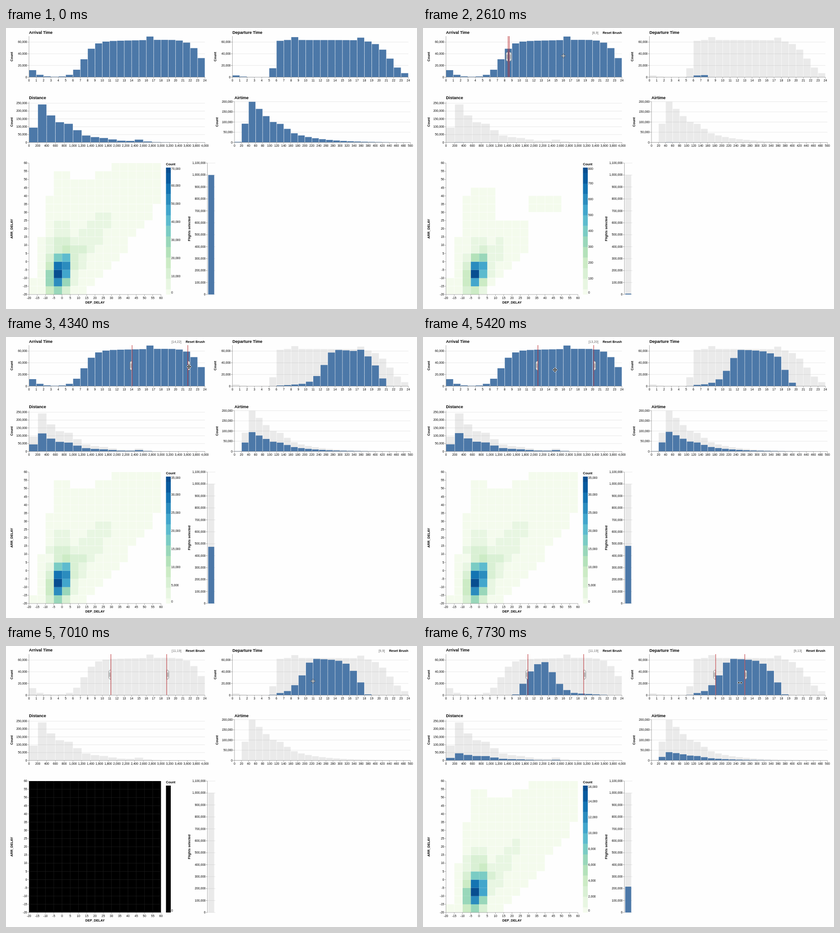
Animation of 903 by 620 pixels, one loop 8 s. Source, as an HTML page with a canvas:

```html
<!DOCTYPE html>
<html lang="en">
<head>
<meta charset="utf-8">
<title>Linked flight histograms</title>
<style>
html, body { margin: 0; width: 100%; height: 100%; overflow: hidden; background: #fefefe; }
canvas { display: block; }
</style>
</head>
<body>
<canvas id="stage" width="903" height="620"></canvas>
<script>
const g = document.getElementById('stage').getContext('2d');
const LOOP = 8000, HOUR = 16.1, BLUE = '#4c78a8', GHOST = 'rgba(150,150,150,.19)';
const FONT = '"Liberation Sans", Arial, sans-serif';

const clamp = (v, lo, hi) => Math.min(hi, Math.max(lo, v));
const sum = list => list.reduce((a, b) => a + b, 0);
const fmt = n => n.toLocaleString('en-US');
const sigmoid = x => 1 / (1 + Math.exp(-x));
const bump = (x, center, width = 1) => Math.exp(-(((x - center) / width) ** 2));
const make = (n, f) => Array.from({ length: n }, (_, i) => f(i));

// Histogram counts in thousands: a busy day with quiet nights, and long decaying tails
const arrivals = make(24, h => 12 * Math.exp(-1.1 * h) + 6 * bump(h, 16, .5)
  + (59.5 + h / 4) * sigmoid((h - 7) / .75) * sigmoid((23 - h) / .85));
const departures = make(24, h => 3 * Math.exp(-1.1 * h) + 5 * (bump(h, 8, .5) + bump(h, 17, .5))
  + 63.5 * sigmoid((h - 5.23) / .2) * sigmoid((21 - h) / .95));
const distances = make(20, i => 351 * .7 ** i * sigmoid((i - .19) / .19)
  + 36 * bump(i, 4.2) + 8 * bump(i, 8, 1.5) + 13 * bump(i, 12, .8));
const airtimes = make(25, i => 340 * .775 ** i * sigmoid((i - 1.15) / .24)
  + 8 * bump(i, 3.5) + 18 * bump(i, 6.2));

// Share of flights that have landed x hours after the hour they left in
const landed = x => .9 * (1 - Math.exp(-((Math.max(0, x - .6) / 1.97) ** 1.75))) + .1 * clamp(x / 10, 0, 1);

// Heatmap moods: left edge shift, peak of columns 2 and 4, peak width, strength of the far cells
const heats = {
  all: { edge: 3, left: .43, right: .74, width: 2.33, far: 1 },
  wide: { edge: 4, left: .28, right: .74, width: 2.33, far: 1 },
  thin: { edge: 3, left: .3, right: .65, width: 1.84, far: .4, sparse: true },
  both: { edge: 4, left: .43, right: .7, width: 2.33, far: .7 }
};

const span = left => [left, left + 122.5];
const steps = [
  { t: 0 },
  { t: 450, cur: ['arrow', 181.5, 28] },
  { t: 840, cur: ['arrow', 184, 53] },
  { t: 1050, cur: ['arrow', 185, 59] },
  { t: 1500, cur: ['arrow', 185.7, 59] },
  { t: 2160, cur: ['cross', 213, 64.5] },
  { t: 2610, cur: ['cross', 308.5, 61.5], arr: [187, 189.5], heat: 'thin', max: 800 },
  { t: 2940, cur: ['cross', 308.5, 61.5], arr: span(187) },
  { t: 3260, cur: ['move', 250.5, 68.5], arr: span(187) },
  { t: 3720, cur: ['move', 291.5, 68.5], arr: span(187) },
  { t: 4070, cur: ['move', 338, 67], arr: span(231.5) },
  { t: 4340, cur: ['move', 402, 65.5], arr: span(277) },
  { t: 4910, cur: ['move', 313, 70], arr: span(314.5) },
  { t: 5420, cur: ['move', 290, 72.5], arr: span(252.5) },
  { t: 5930, cur: ['cross', 544, 60], arr: span(230.5) },
  { t: 6380, cur: ['cross', 649.5, 74], arr: span(230.5) },
  { t: 6770, cur: ['cross', 649, 74.5], arr: span(230.5) },
  { t: 7010, cur: ['cross', 674.5, 77.5], arr: span(230.5), dep: [643, 643], heat: 'both', max: 0 },
  { t: 7280, cur: ['cross', 706, 79.5], arr: span(230.5), dep: [643, 674.5], heat: 'both', max: 8000 },
  { t: 7730, cur: ['resize', 696.5, 81], arr: span(230.5), dep: [643, 707], heat: 'both', max: 16000 }
];

// Green to blue colour ramp in even steps
const LEVELS = 12;
const stops = ['f7fcf0', 'e0f3db', 'ccebc5', 'a8ddb5', '7bccc4', '4eb3d3', '2b8cbe', '0868ac', '084081']
  .map(h => [0, 2, 4].map(i => parseInt(h.slice(i, i + 2), 16)));
function ramp(t) {
  const p = clamp(Math.round(t * LEVELS) / LEVELS, .015, .955) * 8, n = Math.floor(p);
  return `rgb(${stops[n].map((v, j) => Math.round(v + (stops[n + 1][j] - v) * (p - n)))})`;
}

function rect(x, y, w, h, color) {
  g.fillStyle = color;
  g.fillRect(x, y, w, h);
}

function line(x0, y0, x1, y1, color = '#888', width = .7) {
  g.strokeStyle = color;
  g.lineWidth = width;
  g.beginPath();
  g.moveTo(x0, y0);
  g.lineTo(x1, y1);
  g.stroke();
}

function text(s, x, y, size = 6.6, align = 'left', bold = false, color = '#000') {
  g.font = `${bold ? 'bold ' : ''}${size}px ${FONT}`;
  g.textAlign = align;
  g.textBaseline = 'middle';
  g.fillStyle = color;
  g.fillText(s, x, y + .3);
}

function sideTitle(s, x, y) {
  g.save();
  g.translate(x, y);
  g.rotate(-Math.PI / 2);
  text(s, 0, 0, 7.2, 'center', true);
  g.restore();
}

function yTick(x, y, s) {
  line(x - 3.5, y, x, y);
  text(s, x - 4, y, 6.6, 'right');
}

function xTick(x, y, s) {
  line(x, y, x, y + 3.5);
  text(s, x, y + 7.7, 6.6, 'center');
}

function histogram({ x, w = 386.5, top, base, unit, step, title, titleY, countX, bin, data }, blue) {
  const n = data.length, bw = w / n;
  text(title, x, titleY, 9, 'left', true);
  sideTitle('Count', countX, (top + base) / 2);
  for (let v = 0; base - v * unit >= top - .6; v += step) {
    const y = base - v * unit;
    if (v) line(x, y, x + w, y, '#ddd');
    yTick(x, y, fmt(v * 1000));
  }
  const bars = (list, color) => list.forEach((v, i) =>
    rect(x + i * bw + .4, base - v * unit, bw - .7, v * unit, color));
  if (blue !== data) bars(data, GHOST);
  bars(blue, BLUE);
  line(x, top, x, base);
  line(x, base, x + w, base);
  for (let i = 0; i <= n; i++) xTick(x + i * bw, base, fmt(i * bin));
}

function handle(x, dir) {
  g.save();
  g.translate(x, 53);
  g.scale(dir, 1);
  g.fillStyle = 'rgba(238,238,238,.85)';
  g.strokeStyle = '#666';
  g.lineWidth = .7;
  g.beginPath();
  g.moveTo(0, 0);
  g.arcTo(4.7, 0, 4.7, 4, 4.2);
  g.lineTo(4.7, 16);
  g.arcTo(4.7, 20.5, 0, 20.5, 4.2);
  g.closePath();
  g.fill();
  g.stroke();
  line(1.6, 5.5, 1.6, 15);
  line(3.1, 5.5, 3.1, 15);
  g.restore();
}

function brush([l, r], x) {
  const hours = [l, r].map(v => Math.round((v - x) / HOUR));
  text(`[${hours}]`, x + 335, 10.5, 7.2, 'right', false, '#666');
  text('Reset Brush', x + 386.5, 10.5, 7.2, 'right', true);
  if (l === r) return;
  handle(l, -1);
  handle(r, 1);
  for (const v of [l, r]) line(v, 18, v, 108, '#b8262b', 1);
}

// Cells are counted from the bottom left: column c, row a
function filled(c, a, { edge, sparse }) {
  if (c < Math.floor((a + edge) / 5)) return false;
  if (!sparse) {
    const notch = a > 13 && c > 4 && c < 8 || a > 14 && c < 10;
    return !notch && c < Math.floor(7.95 + .85 * a - .005 * a * a);
  }
  if (a < 9) return c < Math.floor(Math.min(10, 5.5 + .9 * a));
  return a < 13 && c < 6 || (a === 10 || a === 11) && c > 9 && c < 14;
}

function density(c, a, { left, right, width, far }) {
  if (c < 2) return 0;
  if (c < 5) {
    const core = [left, .97, right][c - 2] * bump(a, .3 + .6 * c, width);
    const tail = far * (c > 2 ? .2 : .06) * Math.exp(-Math.abs(a - 6) / 1.5);
    return Math.max(core, tail);
  }
  const ridge = 1.25 * c - 2.3;
  return far * .2 * Math.exp((5 - c) / 3.2) * bump(a, ridge, a > ridge ? 1.8 : 2.5);
}

function heatmap(heat, max) {
  const x = 50.5, y = 298, size = 18.125;
  if (max) {
    for (let c = 0; c < 16; c++) for (let a = 0; a < 16; a++) {
      if (!filled(c, a, heat)) continue;
      const t = density(c, a, heat), s = t < .1 ? 17.5 : 18.2;
      rect(x + c * size + .3, y + (15 - a) * size, s, s, ramp(t));
    }
    for (let i = 0; i <= LEVELS; i++) {
      const [lo, hi] = [i - .5, i + .5].map(v => 588 - 280 * clamp(v / LEVELS, 0, 1));
      rect(351.5, hi, 10.5, lo - hi + .3, ramp(i / LEVELS));
    }
  } else {
    rect(x, y, 290, 290, '#000');
    rect(351.5, 308, 10.5, 280, '#000');
    for (let i = 1; i < 16; i++) {
      line(x + i * size, y, x + i * size, 588, '#222');
      line(x, y + i * size, 340.5, y + i * size, '#222');
    }
  }
  text('Count', 351.5, 301, 7.2, 'left', true);
  const n = max ? (max % 7 ? 8 : 7) : 0;
  for (let i = 0; i <= n; i++) {
    const part = n && i / n;
    text(fmt(max * part), 363, clamp(588 - 280 * part, 311, 584));
  }
  line(x, y, x, 588);
  line(x, 588, 340.5, 588);
  for (let i = 0; i <= 16; i++) {
    yTick(x, 588 - i * size, i * 5 - 20);
    xTick(x + i * size, 588, i * 5 - 20);
  }
  sideTitle('ARR_DELAY', 12.5, 443);
  text('DEP_DELAY', 195.5, 605.5, 7.2, 'center', true);
}

function selectedBar(share) {
  for (let i = 0; i <= 11; i++) {
    const y = 588 - i * 290 / 11;
    line(442.5, y, 460, y, '#ddd');
    yTick(442.5, y, fmt(i * 100000));
  }
  const full = 2900 / 11;
  if (share < 1) rect(444.3, 588 - full, 13.2, full, GHOST);
  rect(444.3, 588 - full * share, 13.2, full * share, BLUE);
  line(442.5, 298, 442.5, 588);
  sideTitle('Flights selected', 402.5, 443);
}

// Points of one arm, repeated at each turn
const turned = (arm, turns) => turns.flatMap(a => arm.map(([x, y]) =>
  [x * Math.cos(a) - y * Math.sin(a), x * Math.sin(a) + y * Math.cos(a)]));
const quarters = make(4, i => i * Math.PI / 2);
const tip = [[.6, -.6], [2.5, -.6], [2.5, -2], [5, 0], [2.5, 2], [2.5, .6], [.6, .6]];
const cursors = {
  arrow: [[[0, 0], [0, 9.6], [2.2, 7.6], [3.9, 11.3], [5.5, 10.6], [3.9, 7], [7, 7]], '#000', '#fff'],
  cross: [turned([[.6, -.6], [4.3, -.6], [4.3, .6], [.6, .6]], quarters), '#fff', '#444'],
  move: [turned(tip, quarters), '#000', '#fff'],
  resize: [turned(tip, [0, Math.PI]), '#000', '#fff']
};

function drawCursor([kind, x, y]) {
  const [points, fill, edge] = cursors[kind];
  g.beginPath();
  points.forEach(([px, py]) => g.lineTo(x + px, y + py));
  g.closePath();
  g.lineJoin = 'round';
  g.strokeStyle = edge;
  g.lineWidth = 1.3;
  g.stroke();
  g.fillStyle = fill;
  g.fill();
}

function draw(time) {
  const { arr, dep, cur, heat = arr ? 'wide' : 'all', max = arr ? 35000 : 70000 } =
    steps.findLast(step => step.t <= time);
  const [a, b] = (arr || [0, 0]).map(v => (v - 50.5) / HOUR);
  const [p, q] = (dep || [0, 0]).map(v => (v - 497.5) / HOUR);
  const depBlue = arr ? departures.map((v, h) => v * (landed(b - h) - landed(a - h))) : departures;
  const arrBlue = dep ? arrivals.map((v, h) => v * (landed(h - p + .82) - landed(h - q + .82))) : arrivals;
  const overlap = h => Math.max(0, Math.min(b, h + 1) - Math.max(a, h));
  const share = dep ? sum(arrBlue.map((v, h) => v * overlap(h))) / 1000
    : arr ? sum(depBlue) / 1000 : 1;
  const part = data => arr
    ? data.map((v, i) => v * share * (dep ? Math.min(1.1, .8 + .07 * i) : 1)) : data;

  rect(0, 0, 903, 620, '#fefefe');
  const hours = { top: 18, base: 108.5, unit: 1.29, step: 20, bin: 1 };
  const lower = { top: 162.5, base: 252.5, titleY: 154, step: 50 };
  histogram({ ...hours, x: 50.5, title: 'Arrival Time', titleY: dep ? 9.3 : 10, countX: 12.5, data: arrivals }, arrBlue);
  histogram({ ...hours, x: 497.5, title: 'Departure Time', titleY: 10, countX: 459.5, data: departures }, depBlue);
  histogram({ ...lower, x: 50.5, unit: .346, bin: 200, title: 'Distance', countX: 12.5, data: distances }, part(distances));
  histogram({ ...lower, x: 502, unit: .45, bin: 20, title: 'Airtime', countX: 463.5, data: airtimes }, part(airtimes));
  heatmap(heats[heat], max);
  selectedBar(share);
  if (arr) brush(arr, 50.5);
  if (dep) brush(dep, 497.5);
  if (cur) drawCursor(cur);
}

const start = performance.now();
function tick() {
  draw((performance.now() - start) % LOOP);
  requestAnimationFrame(tick);
}
tick();
</script>
</body>
</html>
```
